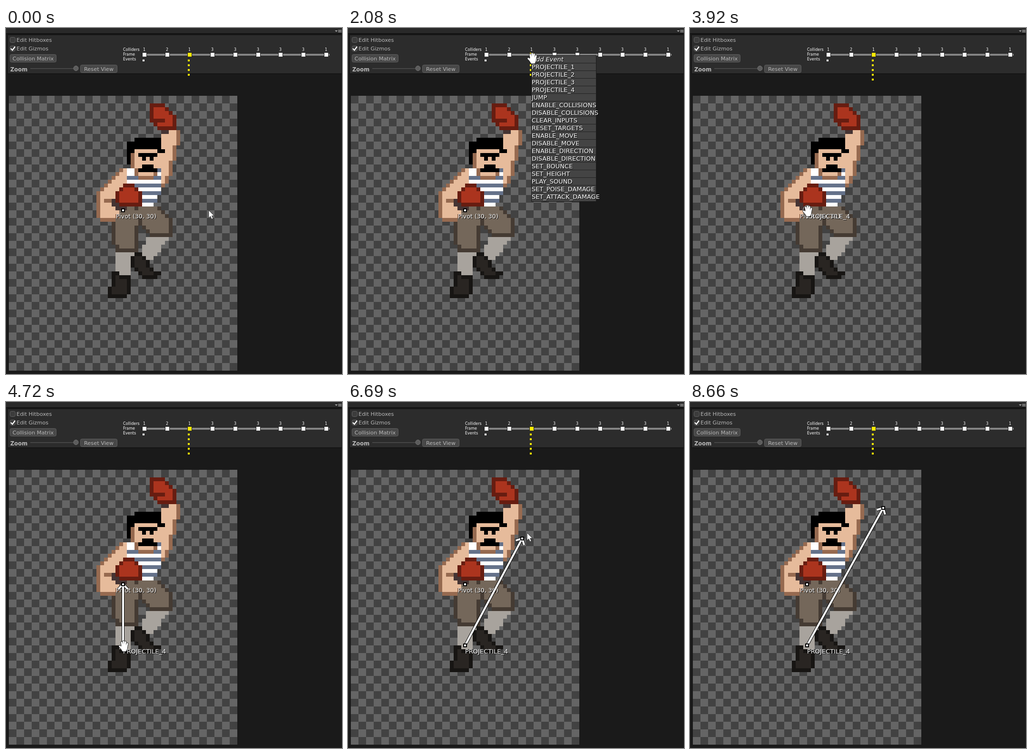
These frames come from a looping animation (706x725 px, 9.38 s). An HTML page with a canvas:

```html
<!DOCTYPE html>
<html lang="en">
<head>
<meta charset="utf-8">
<title>Frame event editor</title>
<style>
html, body { margin: 0; width: 100%; height: 100%; overflow: hidden; background: #1a1a1a; }
canvas { display: block; }
</style>
</head>
<body>
<canvas id="stage" width="706" height="725"></canvas>
<script>
const W = 706, H = 725, LOOP = 9380;
const CELL = 8, LEFT = 6, TOP = 142;
const PIVOT = { x: 246, y: 382 };
const FONT = '"DejaVu Sans", Verdana, sans-serif';
const MENU_OPEN = 1440, MENU_PICK = 2710, LAG = 30;
const YELLOW = '#ffeb04', LABEL = '#b8b8b8';
const ORIGIN_DRAG = [3920, 4720], TIP_DRAG = [6030, 7440];
const CLICKS = [[1410, 1490], [2680, 2740], [3920, 4010], [6030, 6235], [7430, 7790]];
const MENU = ['PROJECTILE_1', 'PROJECTILE_2', 'PROJECTILE_3', 'PROJECTILE_4', 'JUMP',
  'ENABLE_COLLISIONS', 'DISABLE_COLLISIONS', 'CLEAR_INPUTS', 'RESET_TARGETS',
  'ENABLE_MOVE', 'DISABLE_MOVE', 'ENABLE_DIRECTION', 'DISABLE_DIRECTION',
  'SET_BOUNCE', 'SET_HEIGHT', 'PLAY_SOUND', 'SET_POISE_DAMAGE', 'SET_ATTACK_DAMAGE'];

// Pointer gestures: start time, end time, destination
const HOME = { x: 426, y: 382 };
const GESTURES = [
  [220, 930, 386, 72], [930, 1130, 387, 61],
  [2080, 2450, 412, 131], [2710, 3120, 250, 386], [3270, 3640, 247, 381],
  [3920, 4300, 319, 440], [4300, 4720, 247, 509],
  [5000, 5290, 250, 388], [5470, 5760, 248, 381],
  [6130, 6250, 315, 374], [6250, 6940, 402, 232],
  [7230, 7370, 411, 221.5], [7990, 8660, 636, 745]];

const stage = document.getElementById('stage').getContext('2d');
const backdrop = document.createElement('canvas');
backdrop.width = W;
backdrop.height = H;
let g = backdrop.getContext('2d');

function box(color, x, y, w, h) {
  g.fillStyle = color;
  g.fillRect(x, y, w, h);
}

function text(str, x, y, size, color = '#fff', style = '') {
  g.font = `${style} ${size}px ${FONT}`;
  g.fillStyle = color;
  g.fillText(str, x, y);
}

function shadowText(str, x, y, size = 13, style = '') {
  text(str, x + 1, y + 1, size, '#000', style);
  text(str, x, y, size, '#fff', style);
}

function outlined(fill, stroke, width = 1) {
  g.fillStyle = fill;
  g.fill();
  g.strokeStyle = stroke;
  g.lineWidth = width;
  g.stroke();
}

function roundBox(x, y, w, h, fill, stroke) {
  g.beginPath();
  g.roundRect(x + .5, y + .5, w - 1, h - 1, 3);
  outlined(fill, stroke);
}

function button(label, x, y, w, h) {
  roundBox(x, y, w, h, '#484848', '#5e5e5e');
  g.textAlign = 'center';
  text(label, x + w / 2, y + h / 2 + 4, 11.3, LABEL);
  g.textAlign = 'left';
}

function checkbox(label, y, checked) {
  roundBox(8, y, 12, 12, '#3c3c3c', '#626262');
  if (checked) {
    g.stroke(new Path2D(`M10 ${y + 6}l3.5 3.5l5.5 -7.5`));
    g.strokeStyle = '#fff';
    g.lineWidth = 2.2;
    g.stroke(new Path2D(`M10 ${y + 6}l3.5 3.5l5.5 -7.5`));
  }
  text(label, 22, y + 10, 11.3, LABEL);
}

const markerX = i => Math.round(290.9 + i * 47.75);

function eventDot(color, x, row) {
  box(color, x, 66 + row * 10, 4, 4);
}

function drawPanel() {
  box('#1a1a1a', 0, 0, W, H);
  box('#292929', 0, 0, W, 11);
  box('#111', 0, 11, W, 2);
  box('#141414', 3, 14, 703, 83);
  box('#2c2c2c', 4, 15, 701, 80);
  g.fillStyle = '#aaa';
  g.fill(new Path2D('M691 5h6l-3 3Z'));
  for (let y = 4; y < 10; y += 2) box('#aaa', 698, y, 7, 1);

  checkbox('Edit Hitboxes', 19, false);
  checkbox('Edit Gizmos', 37, true);
  button('Collision Matrix', 8, 55, 98, 17);
  button('Reset View', 156, 77, 78, 17);
  text('Zoom', 9, 91, 11.5, LABEL, 'bold');
  box('#464646', 51, 84, 96, 2);
  g.beginPath();
  g.arc(147, 84.5, 5, 0, 7);
  outlined('#5c5c5c', '#757575');

  ['Colliders', 'Frame', 'Events'].forEach((s, i) => text(s, 246, 48 + i * 10, 8));
  box('#858585', 288, 54, 392, 4);
  for (let i = 0; i < 9; i++) {
    const x = markerX(i);
    const colliders = i === 1 ? 2 : i > 2 && i < 8 ? 3 : 1;
    box('#1c1c1c', x - 5, 52, 10, 8);
    box(i === 2 ? YELLOW : '#fff', x - 4, 52, 8, 8);
    text(colliders, x - 3, 48, 8);
  }
  eventDot('#fff', 287, 0);
  for (let i = 0; i < 4; i++) eventDot(YELLOW, 382, i);
}

function drawChecker() {
  for (let r = 0; r < 36; r++)
    for (let c = 0; c < 30; c++)
      box((r + c) % 2 ? '#656565' : '#424242', LEFT + c * 16, TOP + r * 16, 16, 16);
}

function block(color, c, r, w = 1, h = 1) {
  box(color, LEFT + c * CELL, TOP + r * CELL, w * CELL, h * CELL);
}

// Fills the grid cells inside a polygon; cells open to a listed side take the edge colour.
function part(points, fill, edge, sides = 'lrtb') {
  const shape = new Path2D(`M${points}Z`);
  const inside = (c, r) => g.isPointInPath(shape, c + .5, r + .5);
  for (let r = 0; r < 72; r++)
    for (let c = 0; c < 60; c++) {
      if (!inside(c, r)) continue;
      const open = edge && (
        sides.includes('l') && !inside(c - 1, r) || sides.includes('r') && !inside(c + 1, r) ||
        sides.includes('t') && !inside(c, r - 1) || sides.includes('b') && !inside(c, r + 1));
      block(open ? edge : typeof fill === 'function' ? fill(r) : fill, c, r);
    }
}

function drawBoxer() {
  const skin = '#e6bb9b', tan = '#966a50', red = '#ab341e', maroon = '#671d11';
  const band = '#453433', cloth = '#74675a', seam = '#453b33';
  const sock = '#a8a39d', boot = '#292522', sole = '#171513';
  const stripes = r => r % 2 ? '#65728a' : '#fff';

  // raised arm and glove
  part('42,9 45,9 45,13 44.4,13 44,17 43,17 43,20 41,24 40,24 40,10', skin, tan, 'r');
  block(band, 40, 9, 2);
  part('37,2 40.9,2 43.9,5 44,8 43,9 39,9 37,6', red, maroon);
  block(maroon, 38, 6, 3);

  // legs
  part('28,41 33,41 32,47 28,47', sock);
  part('37,36 42,37 38,43 35,43 35,40', sock);
  part('34,41 35,41 37.5,45 40,46.5 38,48 36,48 32,44.6 32,43', boot, sole);
  part('27,46 29,46 29,47 32,47 32,51 30,53 27,53 26,52 26,50 27,50', boot, sole);
  part('30,29 36,29 34,35 34,41 28.6,41 27,38.8 27,32', cloth, seam, 'lrb');
  part('33,29 39,29 43,33 43,36 42,37 37,37 34.6,33.6', cloth, seam, 'rb');

  // torso and head
  part('31,19 33,19 34,20 38,20 40,19 40,25 38,29 34,29 31,26', stripes);
  block('#fff', 31, 19, 2);
  part('33,19 39,19 38,22 34,22', skin, tan, 'lrb');
  part('32,14 40,14 40,18 38,20 34,20 32,19', skin, tan, 'l');
  part('33,11 40,11 40,14 41,14 41,15 39,15 39,14 33,14 33,15 32,15 32,18 31,18 31,12 33,12', '#000');
  block('#000', 34, 15, 5);
  for (const c of [35, 37]) block('#000', c, 16);
  part('35,18 38,18 39,20 34,20', '#000');

  // lowered arm and glove
  part('29,19 31,19 31,23.6 28,26.6 29,31 28,33 25,33 23,31 23,26', skin, tan, 'lb');
  block(tan, 25, 27, 2);
  part('27,27 29,27 31,30 28,30', band);
  part('31,23 33,23 34.9,25 35,29 30,29 28,27 28,26', red, maroon);
}

function pointerAt(t) {
  let { x, y } = HOME;
  for (const [start, end, toX, toY] of GESTURES) {
    const u = Math.min(1, Math.max(0, (t - start) / (end - start)));
    const ease = u * u * (3 - 2 * u);
    x += (toX - x) * ease;
    y += (toY - y) * ease;
  }
  return { x, y };
}

// Handles follow the pointer slightly late and stick to the pixel grid.
function draggedHandle(t, [start, end]) {
  if (t < start) return PIVOT;
  const p = pointerAt(Math.min(end, Math.max(start, t - LAG)));
  return {
    x: LEFT + Math.floor((p.x - LEFT) / CELL) * CELL,
    y: TOP + Math.ceil((p.y - TOP) / CELL) * CELL
  };
}

function handle(p) {
  box('#000', p.x - 4, p.y - 4, 8, 8);
  box('#fff', p.x - 2, p.y - 2, 4, 4);
}

function arrow(from, to) {
  if (from.x === to.x && from.y === to.y) return;
  const back = Math.atan2(from.y - to.y, from.x - to.x);
  g.beginPath();
  g.moveTo(from.x, from.y);
  g.lineTo(to.x, to.y);
  for (const turn of [-Math.PI / 4, Math.PI / 4]) {
    g.moveTo(to.x, to.y);
    g.lineTo(to.x + 14 * Math.cos(back + turn), to.y + 14 * Math.sin(back + turn));
  }
  for (const [color, width] of [['#000', 6], ['#fff', 4]]) {
    g.strokeStyle = color;
    g.lineWidth = width;
    g.stroke();
  }
}

function drawMenu(p) {
  box('#1c1c1c', 385, 57, 137, 307);
  box('#444', 386, 58, 135, 305);
  shadowText('Add Event', 386, 70, 13, 'italic');
  const hover = Math.floor((p.y - 58) / 16) - 1;
  MENU.forEach((name, i) => {
    const y = 74 + i * 16;
    box('#222', 386, y - 1, 135, 1);
    if (i === hover) box('#0a98ff', 386, y, 135, 15);
    shadowText(name, 386, y + 12);
  });
}

function drawArrowPointer({ x, y }) {
  g.save();
  g.translate(x, y);
  g.beginPath();
  [[0, 0], [0, 16], [3.6, 12.6], [6.2, 18.4], [9, 17.2], [6.5, 11.6], [11.2, 11.3]]
    .forEach(p => g.lineTo(...p));
  g.closePath();
  outlined('#fff', '#222', .8);
  g.restore();
}

function drawHand({ x, y }) {
  const fingers = new Path2D('M-8 3L-2 9');
  for (let i = 0; i < 4; i++) {
    fingers.moveTo(i * 4 - 4, -7 + (i - 1.2) ** 2 * 1.4);
    fingers.lineTo(i * 2.6 - 2, 5);
  }
  const palm = new Path2D('M-4 2L8 2L7 9L5 13L-2 13L-5 8Z');
  g.save();
  g.translate(x, y);
  g.lineCap = g.lineJoin = 'round';
  for (const [color, grow] of [['#151515', 1.6], ['#fff', 0]]) {
    g.strokeStyle = g.fillStyle = color;
    g.lineWidth = 3.4 + grow;
    g.stroke(fingers);
    g.fill(palm);
    g.lineWidth = 1 + grow;
    g.stroke(palm);
  }
  g.restore();
}

function drawRing({ x, y }) {
  g.beginPath();
  g.arc(x, y, 9.3, 0, 7);
  for (const [color, width] of [['rgba(0,0,0,.55)', 2.2], ['#eee', 1]]) {
    g.strokeStyle = color;
    g.lineWidth = width;
    g.stroke();
  }
}

function draw(t) {
  g.drawImage(backdrop, 0, 0);
  const pointer = pointerAt(t);
  const hasEvent = t >= MENU_PICK;
  const origin = draggedHandle(t, ORIGIN_DRAG);
  const tip = draggedHandle(t, TIP_DRAG);

  shadowText('Pivot (30, 30)', 231, 399, 12.6);
  handle(PIVOT);
  if (hasEvent) {
    eventDot(YELLOW, 382, 4);
    arrow(origin, tip);
    handle(origin);
    handle(tip);
    shadowText('PROJECTILE_4', origin.x, origin.y + 17);
  }
  if (t >= MENU_OPEN && !hasEvent) drawMenu(pointer);

  const near = p => Math.hypot(pointer.x - p.x, pointer.y - p.y) < 12;
  const grabbing = [origin, tip, { x: markerX(2), y: 56 }].some(near);
  if (CLICKS.some(([a, b]) => t >= a && t < b)) drawRing(pointer);
  (grabbing ? drawHand : drawArrowPointer)(pointer);
}

drawPanel();
drawChecker();
drawBoxer();
g = stage;

const begin = performance.now();
function tick() {
  draw((performance.now() - begin) % LOOP);
  requestAnimationFrame(tick);
}
tick();
</script>
</body>
</html>
```
